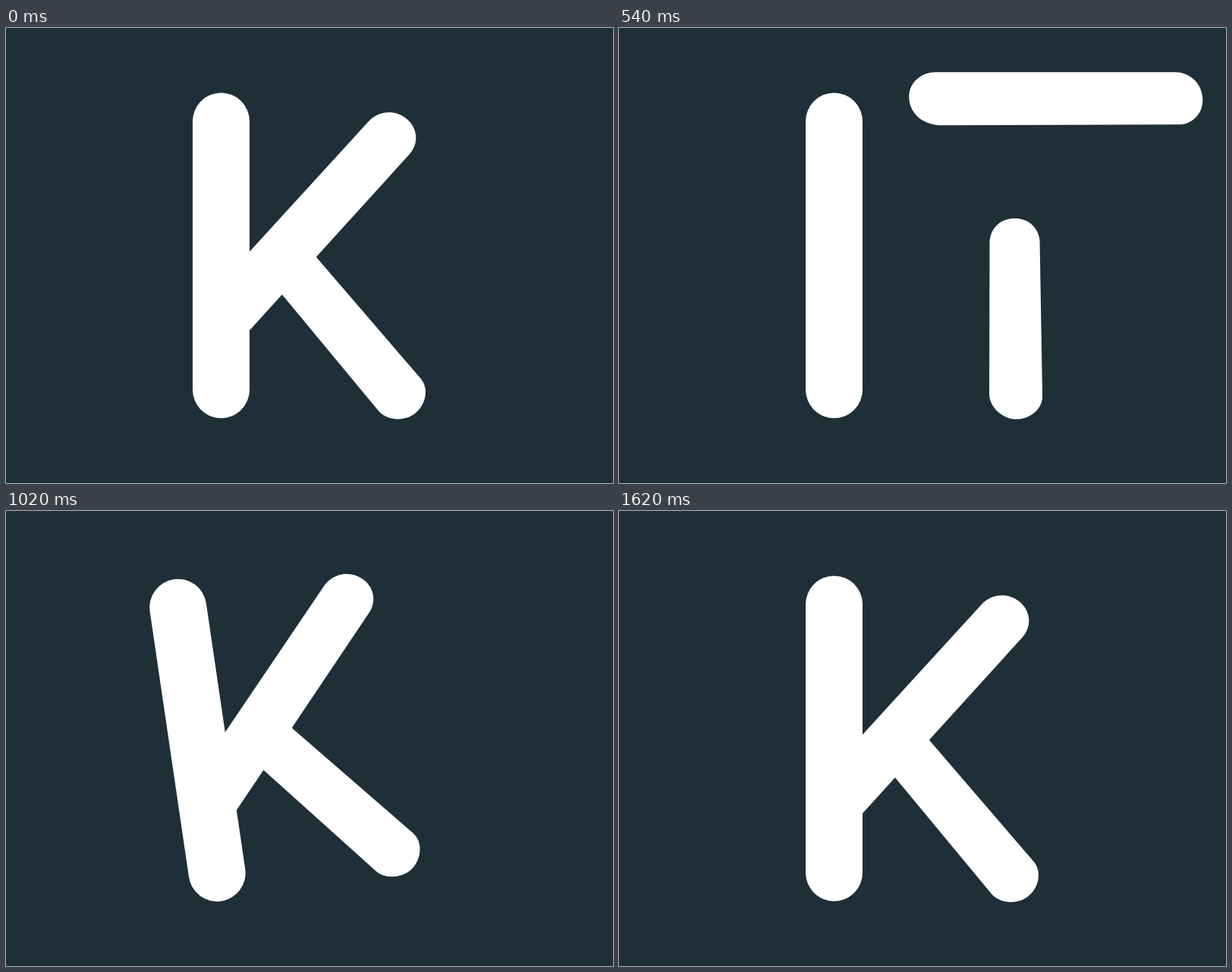
An HTML page that plays this animation: 800 px wide and 600 px high, repeating every 1.83 s.

```html
<!DOCTYPE html>
<html>
<head>
<meta charset="utf-8">
<style>
html, body { margin: 0; height: 100%; overflow: hidden; background: #1e2f38; }
svg { display: block; width: 800px; height: 600px; fill: #fff; }
</style>
</head>
<body>
<svg viewBox="0 0 800 600">
  <g id="letter">
    <path id="stem" stroke="#fff" stroke-width="75" stroke-linecap="round"/>
    <path id="leg"/>
    <path id="arm"/>
  </g>
</svg>
<script>
const LOOP = 1830, STEP = 30, END = 1620;
const [letter, stem, leg, arm] = ['letter', 'stem', 'leg', 'arm'].map(id => document.getElementById(id));

const progress = (t, from, to) => Math.min(1, Math.max(0, (t - from) / (to - from)));
const smooth = p => (1 - Math.cos(Math.PI * p)) / 2;
const mix = (a, b, p) => a + (b - a) * p;
const place = (x, y, angle) => `translate(${x} ${y}) rotate(${angle})`;

// Start, end and peak angle of each swing of the finished letter
const swings = [
  [927, 1147, -8.6], [1147, 1237, 3.3], [1237, 1400, -1.8], [1400, 1500, 0.7], [1500, 1620, -0.3]
];

// Both shapes have their origin in the centre of one rounded end
const legShape = n => `M-35 1C-35 18-17 34 0.5 34S35 21 35 4L31.5 ${-n}
  C29 ${-n - 19} 15 ${-n - 29}-1.5 ${-n - 29}S-32 ${-n - 19}-34.5 ${-n}Z`;
const armShape = n => `M${-n} -35L-1-35C18-35 35-20 35 2C35 20 21 34 3 34L${4 - n} 35
  C${-n - 17} 33 ${-n - 35} 20 ${-n - 35}-3C${-n - 35}-22 ${-n - 18}-35 ${-n}-35Z`;

function draw(t) {
  const grow = smooth(progress(t, 30, 150));
  const settle = (1 - progress(t, 150, 430)) ** 2;
  const fall = progress(t, 470, 611) ** 2;
  const topple = progress(t, 620, 927) ** 1.55;

  stem.setAttribute('d', `M283.5 477V${mix(476.9, 123, smooth(progress(t, 30, 432)))}`);

  const footX = 523 - 5.5 * topple ** 2, footY = 482;
  leg.setAttribute('d', legShape(mix(5, 202 + 47 * settle, grow) + 15 * topple));
  leg.setAttribute('transform', place(footX, footY, -39.8 * topple ** 1.1));

  const armLength = mix(1, 317 + 15 * settle, grow);
  let x = mix(418 + armLength, 732, fall);
  let y = mix(41.2 + 42 * settle, 252.6, fall);
  if (topple > 0) {
    const angle = (-47.5 - 44.7 * topple) * Math.PI / 180;
    const radius = 336 - 26 * (1 - topple) ** 2;
    x = footX + radius * Math.cos(angle);
    y = footY - 0.5 + radius * Math.sin(angle);
  }
  arm.setAttribute('d', armShape(armLength));
  arm.setAttribute('transform', place(x, y, -47.6 * topple ** 0.97));

  let tilt = 0;
  for (const [from, to, peak] of swings)
    if (t > from && t < to) tilt = peak * Math.sin(Math.PI * progress(t, from, to));
  letter.setAttribute('transform', `rotate(${tilt} ${tilt < 0 ? '283.5 514' : '518 512'})`);
}

const start = performance.now();
function tick() {
  const t = Math.floor((performance.now() - start) % LOOP / STEP) * STEP;
  draw(t < STEP ? END : t);
  requestAnimationFrame(tick);
}
tick();
</script>
</body>
</html>
```
